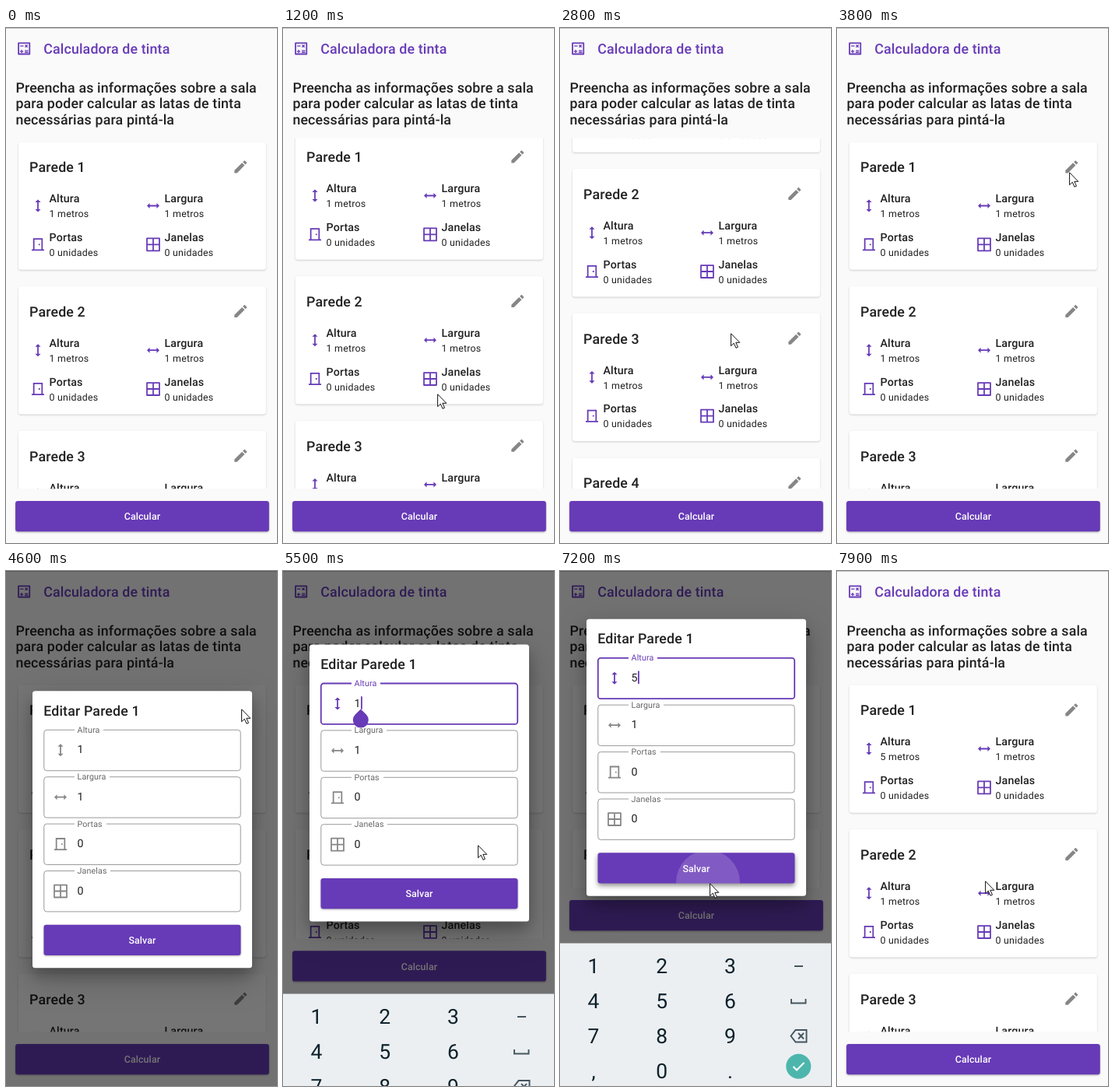
Recreate the animation shown at these times as an HTML page. Size 348 by 662 pixels, loop 8 s.

```html
<!DOCTYPE html>
<html lang="pt-BR">
<head>
<meta charset="utf-8">
<title>Calculadora de tinta</title>
<style>
  html, body { margin: 0; width: 100%; height: 100%; overflow: hidden; background: #fafafa; }
  svg { display: block; }
  #stage { position: absolute; left: 0; top: 0; width: 348px; height: 662px; }
  text { font: 400 12.45px Roboto, sans-serif; letter-spacing: .22px; fill: #212121; text-rendering: geometricPrecision; }
  .h { font-weight: 500; font-size: 17.82px; letter-spacing: .133px; }
  .s { font-weight: 500; font-size: 14.25px; letter-spacing: .133px; }
  .v { font-size: 14.25px; }
  .l { font-size: 10.69px; letter-spacing: .1px; fill: #666; }
  .btn text { font-weight: 500; letter-spacing: .09px; fill: #fff; text-anchor: middle; }
  .btn { filter: drop-shadow(0 1.5px 1.2px rgba(0,0,0,.3)); }
  .btn.down { filter: drop-shadow(0 3px 3px rgba(0,0,0,.45)); }
  .card { fill: #fff; filter: drop-shadow(0 1px .8px rgba(0,0,0,.18)); }
  .panel { fill: #fff; filter: drop-shadow(0 10px 9px rgba(0,0,0,.22)) drop-shadow(0 12px 20px rgba(0,0,0,.2)); }
  .purple { color: #673ab7; fill: #673ab7; }
  .grey { color: #868686; }
  .outline { fill: none; stroke: #9a9a9a; }
  .focus .outline { stroke: #673ab7; stroke-width: 1.8; }
  .focus .l { fill: #673ab7; }
  .focus .grey { color: #673ab7; }
  #keys text { font-size: 26.5px; letter-spacing: 0; fill: #0e212b; text-anchor: middle; }
  #keys .mark { fill: none; stroke: #45555e; stroke-width: 1.9; }
</style>
</head>
<body>
<svg id="stage" viewBox="0 0 348 662">
  <defs>
    <symbol id="tall" viewBox="0 0 24 24"><path fill="currentColor" d="M13 7h3l-4-4-4 4h3v10H8l4 4 4-4h-3z"/></symbol>
    <symbol id="wide" viewBox="0 0 24 24"><path fill="currentColor" d="M7 11V8l-4 4 4 4v-3h10v3l4-4-4-4v3z"/></symbol>
    <symbol id="door" viewBox="0 0 24 24"><path fill="none" stroke="currentColor" stroke-width="2" d="M3 20h18M6 20V4h12v16"/><path fill="currentColor" d="M13 11h2v2h-2z"/></symbol>
    <symbol id="pane" viewBox="0 0 24 24"><path fill="none" stroke="currentColor" stroke-width="2" stroke-linejoin="round" d="M3 3h18v18H3zM12 3v18M3 12h18"/></symbol>
    <symbol id="pen" viewBox="0 0 24 24"><path fill="currentColor" d="M3 17.25V21h3.75L17.8 9.94l-3.75-3.75zM20.7 7.04c.4-.4.4-1 0-1.4l-2.33-2.35c-.4-.4-1-.4-1.4 0l-1.84 1.83 3.75 3.75z"/></symbol>
    <symbol id="calc" viewBox="0 0 24 24"><path fill="none" stroke="currentColor" stroke-width="2" stroke-linejoin="round" d="M4 4h16v16H4z"/><path fill="none" stroke="currentColor" stroke-width="1.5" d="M6.3 8.4h5M13.5 6.6l3.6 3.6M17.1 6.6l-3.6 3.6M13 15h5M13 17.5h5M6 16.2h5M8.5 13.7v5"/></symbol>
    <clipPath id="listClip"><rect id="listBox" y="142" width="348" height="450.3"/></clipPath>
    <clipPath id="saveClip"><rect x="48.5" y="454.7" width="253" height="39.3" rx="3.2"/></clipPath>
  </defs>
  <rect width="348" height="662" fill="#fafafa"/>
  <g id="page"></g>
  <g id="modal">
    <rect width="348" height="662" fill="#000" fill-opacity=".54"/>
    <g id="dialog"></g>
  </g>
  <g id="keys"></g>
  <path id="cursor" d="M.6.8v15.900l3.700-3.500 2.700 6.100 2.500-1.100-2.700-5.900h5z" fill="#fff" stroke="#111"/>
</svg>
<script>
const $ = id => document.getElementById(id);
const text = (x, y, cls, str, id = '') => `<text x="${x}" y="${y}" class="${cls}" id="${id}">${str}</text>`;
const icon = (name, cx, cy, cls) =>
  `<use href="#${name}" x="${cx - 10.65}" y="${cy - 10.65}" width="21.3" height="21.3" class="${cls}"/>`;
const button = (id, x, y, w, label, extra = '') => `<g id="${id}" class="btn">
  <rect x="${x}" y="${y}" width="${w}" height="39.3" rx="3.2" fill="#673ab7"/>${extra}
  ${text(x + w / 2, y + 24.3, '', label)}</g>`;

// Main page
const stats = [['tall', 'Altura', '1 metros'], ['wide', 'Largura', '1 metros'],
  ['door', 'Portas', '0 unidades'], ['pane', 'Janelas', '0 unidades']];
const stat = ([name, label, value], i, card) => {
  const x = 41 + i % 2 * 148, y = 77.9 + (i >> 1) * 49.8;
  return icon(name, x, y + 4.2, 'purple') + text(x + 14.5, y, 's', label) +
    text(x + 14.5, y + 19, '', value, `stat${card}${i}`);
};
const card = i => `<g transform="translate(0 ${146.4 + i * 185.7})">
  <rect class="card" x="15.9" width="318" height="164.3" rx="3.5"/>
  ${text(30, 38.9, 'h', 'Parede ' + (i + 1))}${icon('pen', 301.3, 32, 'grey')}
  ${stats.map((s, k) => stat(s, k, i)).join('')}</g>`;
const heading = ['Preencha as informações sobre a sala', 'para poder calcular as latas de tinta', 'necessárias para pintá-la'];
$('page').innerHTML = `<rect width="348" height="1" fill="#bfbfbf"/>
  ${icon('calc', 23.2, 26.4, 'purple')}${text(48.2, 33, 'h purple', 'Calculadora de tinta')}
  ${heading.map((line, i) => text(12.4, 82.6 + i * 20.85, 'h', line)).join('')}
  <g clip-path="url(#listClip)"><g id="list">${[0, 1, 2, 3].map(card).join('')}</g></g>
  ${button('calcBtn', 12.1, 607.9, 325.7, 'Calcular')}`;

// Edit dialog
const field = (i, gap) => `<g id="field${i}" transform="translate(0 ${204 + i * 60.4})">
  <rect class="outline" x="48.8" y=".3" width="252.4" height="52.4" rx="3.5"/>
  <rect x="88" y="-2" width="${gap}" height="5" fill="#fff"/>
  ${text(91.6, 3.8, 'l', stats[i][1])}${icon(stats[i][0], 70, 26.3, 'grey')}
  ${text(91.6, 30.4, 'v', stats[i][2][0], 'value' + i)}</g>`;
$('dialog').innerHTML = `<rect id="panel" class="panel" x="34" y="154.3" width="282" rx="3.5"/>
  ${text(48.2, 185.6, 'h', 'Editar Parede 1')}
  ${field(0, 37)}
  <g id="rest">
    ${field(1, 45)}${field(2, 41)}${field(3, 46)}
    ${button('saveBtn', 48.5, 454.7, 253, 'Salvar',
      '<g clip-path="url(#saveClip)"><circle id="ripple" cx="190" cy="492.5" fill="#fff" fill-opacity=".17"/></g>')}
  </g>
  <rect id="caret" y="221" width="1.8" height="16.5" class="purple"/>
  <path id="handle" class="purple" d="M99.8 237.2l7.1 7.1a10 10 0 1 1-14.2 0z"/>`;

// Keyboard
const rows = ['123', '456', '789', ',0.'];
$('keys').innerHTML = `<rect y="478.5" width="348" height="184" fill="#ebeff2"/>
  ${rows.map((row, r) => [...row].map((key, c) => text(43 + c * 87.7, 517.3 + r * 45, '', key)).join('')).join('')}
  <path class="mark" d="M301 508h11M297 550v5.5h18.5v-5.5M302.5 590h14v15.5h-14l-6-7.75zM306 594l7 7.5M313 594l-7 7.5"/>
  <circle cx="306.3" cy="636.7" r="16" fill="#4db6ac"/>
  <path d="M299.5 637l4.5 4.5 9.5-9.5" fill="none" stroke="#fff" stroke-width="2"/>`;

// Pointer gestures: start ms, end ms, x, y
const gestures = [
  [300, 1200, 198, 470], [1300, 2400, 194, 171], [2500, 3200, 238, 560], [3200, 3500, 298, 185],
  [3900, 4600, 302, 177], [4700, 4900, 219, 221], [5400, 5800, 307, 595], [5900, 6100, 135, 573],
  [6500, 6900, 192, 401], [7300, 7700, 190, 422], [7800, 7900, 190, 398]];

const clamp = (v, lo, hi) => Math.min(hi, Math.max(lo, v));
const ramp = (t, from, to) => clamp((t - from) / (to - from), 0, 1);
const glide = (t, from, to) => 1 - (1 - ramp(t, from, to)) ** 1.5;
const move = (id, x, y) => $(id).setAttribute('transform', `translate(${x} ${y})`);
const show = (id, on) => { $(id).style.display = on ? '' : 'none'; };

function pointer(t) {
  let x = 320, y = 530;
  for (const [from, to, toX, toY] of gestures) {
    const k = glide(t, from, to);
    x += (toX - x) * k;
    y += (toY - y) * k;
  }
  return [Math.round(x), Math.round(y)];
}

// The list follows the pointer in two drags: up to its end, then back down
function scroll(t, y) {
  if (t >= 3200) return 0;
  return clamp((t < 2500 ? 483 : 543) - y, 0, 281);
}

function draw(t) {
  const [x, y] = pointer(t);
  const lift = glide(t, 5300, 5700) - glide(t, 7400, 7700);
  const open = ramp(t, 4100, 4300) - glide(t, 7200, 7400);
  const grow = t >= 6300 && t < 6500 ? 22 : 0;
  const value = t < 6100 ? '1' : t < 6500 ? '' : '5';

  show('cursor', t >= 400);
  move('cursor', x, y);
  move('list', 0, -scroll(t, y));
  move('calcBtn', 0, -185 * lift);
  $('listBox').setAttribute('height', 450.3 - 185 * lift);
  $('stat00').textContent = (t < 7300 ? 1 : 5) + ' metros';

  show('modal', open > 0);
  $('modal').style.opacity = open;
  move('dialog', 0, -92.5 * lift - grow / 2);
  $('panel').setAttribute('height', 356 + grow);
  move('rest', 0, grow);
  $('field0').classList.toggle('focus', t >= 5300);
  $('value0').textContent = value;
  show('caret', t >= 5300 && (t - 5100) % 1000 < 500);
  $('caret').setAttribute('x', value ? 100 : 91.6);
  show('handle', t >= 5400 && t < 6100);
  $('saveBtn').classList.toggle('down', t >= 7100);
  $('ripple').setAttribute('r', 41 * ramp(t, 7000, 7200));

  show('keys', lift > 0);
  move('keys', 0, 184 * (1 - lift));
}

// The picture advances ten times a second
const start = performance.now();
function tick() {
  const elapsed = Math.max(0, performance.now() - start);
  draw(Math.floor(elapsed / 100) * 100 % 8000);
  requestAnimationFrame(tick);
}
tick();
</script>
</body>
</html>
```
